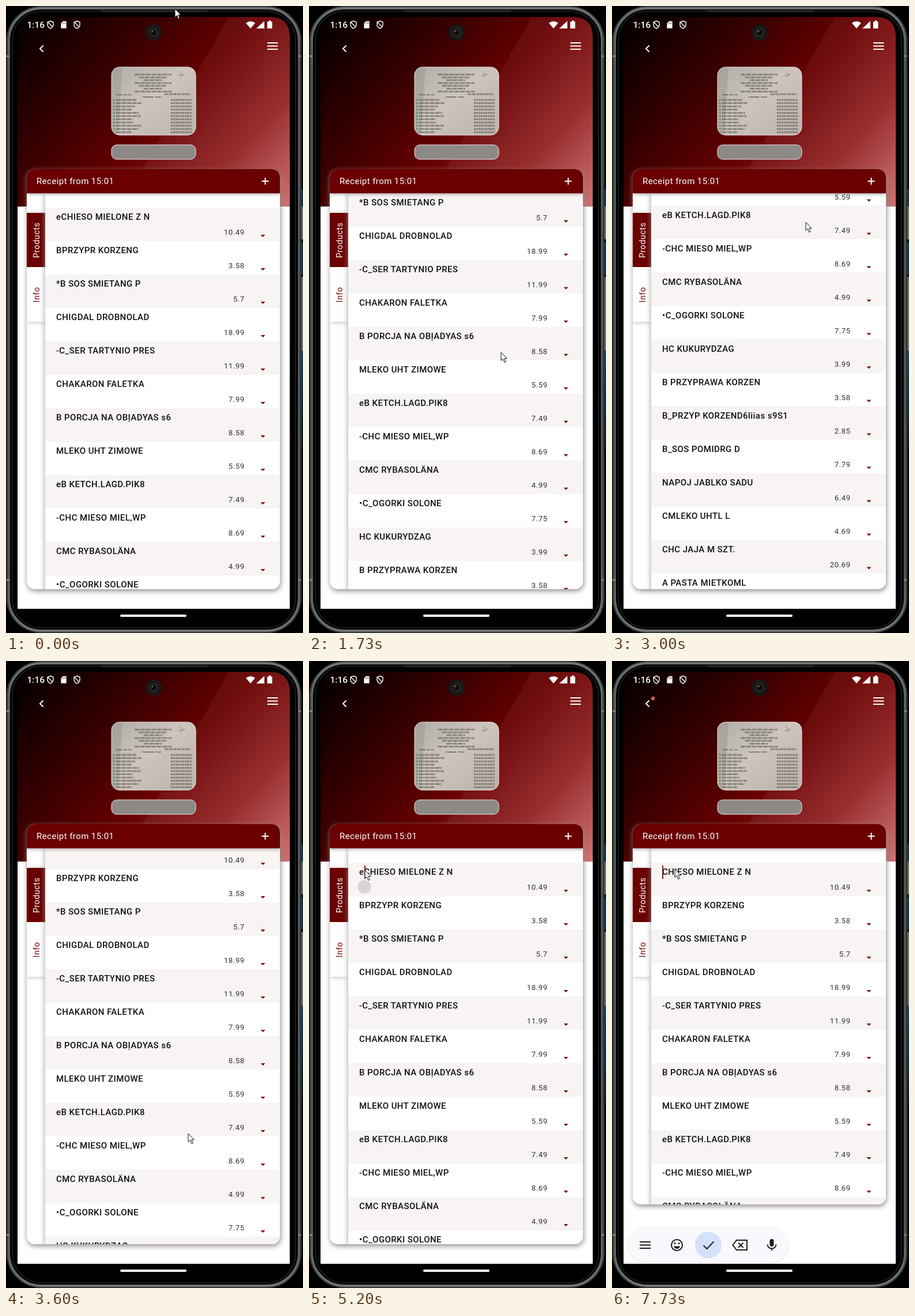
An HTML page for the animation above (8 s loop, 515x1088 px).

```html
<!DOCTYPE html>
<html lang="en">
<head>
<meta charset="utf-8">
<title>Receipt list</title>
<style>
  html, body { margin: 0; width: 100%; height: 100%; overflow: hidden; background: #000; }
  svg { display: block; width: 100vw; height: 100vh; }
  text { font-family: Roboto, sans-serif; letter-spacing: .43px; white-space: pre; }
  .clock { font-size: 15.5px; font-weight: 500; letter-spacing: 0; fill: #fff; }
  .title { font-size: 15px; font-weight: 500; fill: #111; }
  .price { font-size: 13.2px; letter-spacing: .6px; fill: #333; text-anchor: end; }
  .tab { font-size: 14.5px; text-anchor: middle; }
  .tiny { font: 700 4.4px "Liberation Mono", monospace; letter-spacing: 0; fill: #3d3936; }
  .line { fill: none; stroke: #fff; stroke-width: 2; }
  .icon { fill: none; stroke: #1f1f1f; stroke-width: 2; }
  .card { fill: #fff; filter: drop-shadow(1px 3px 5px rgb(140, 135, 135)); }
  .header { fill: #6a0000; filter: drop-shadow(0 1px 3px rgba(140, 130, 130, .9)); }
  .panel { fill: #fff; filter: drop-shadow(-1px 0 4px rgba(150, 145, 145, .75)); }
  .tabs { fill: #fff; filter: drop-shadow(0 1px 4px rgba(150, 145, 145, .6)); }
  .pill { fill: #f8f8fd; filter: drop-shadow(0 1px 2px rgba(0, 0, 0, .12)); }
</style>
</head>
<body>
<svg viewBox="0 0 515 1088" preserveAspectRatio="none">
  <defs>
    <linearGradient id="red" gradientUnits="userSpaceOnUse" x1="70" y1="10" x2="470" y2="370">
      <stop offset="0" stop-color="#0c0000"/>
      <stop offset=".28" stop-color="#3a0000"/>
      <stop offset=".52" stop-color="#680000"/>
      <stop offset=".76" stop-color="#932323"/>
      <stop offset="1" stop-color="#cc6a6a"/>
    </linearGradient>
    <linearGradient id="paper" x1="0" y1="0" x2="1" y2="1">
      <stop offset="0" stop-color="#b2aca6"/>
      <stop offset=".45" stop-color="#cbc5be"/>
      <stop offset="1" stop-color="#bbb3ac"/>
    </linearGradient>
    <linearGradient id="metal" x1="0" y1="0" x2="0" y2="1">
      <stop offset="0" stop-color="#6f7474"/>
      <stop offset=".1" stop-color="#505555"/>
      <stop offset=".9" stop-color="#505555"/>
      <stop offset="1" stop-color="#6f7474"/>
    </linearGradient>
    <linearGradient id="sea" x1="0" y1="0" x2="0" y2="1">
      <stop offset="0" stop-color="#0b4a78"/>
      <stop offset="1" stop-color="#02101c"/>
    </linearGradient>
    <clipPath id="cardClip"><rect class="fit" x="36" y="283" width="439" height="729" rx="14"/></clipPath>
    <clipPath id="photoClip"><rect x="183" y="106" width="146" height="118" rx="14"/></clipPath>
  </defs>

  <!-- Phone body -->
  <rect width="515" height="1088"/>
  <path d="M511 318h4v30h-4zM511 410h4v56h-4z" fill="#0a3554"/>
  <path d="M511 348h4v57h-4zM511 470h4v128h-4z" fill="#77716d"/>
  <path d="M511 598h4v170h-4z" fill="url(#sea)"/>
  <rect x="1.500" y="1" width="510" height="1086" rx="60" fill="#1c1e1e" stroke="#343838" stroke-width="2"/>
  <rect x="5" y="4" width="503" height="1080" rx="56" stroke="url(#metal)" stroke-width="4"/>
  <rect x="11" y="9" width="491" height="1070" rx="50" fill="none" stroke="#1b1d1d" stroke-width="2"/>
  <path d="M165 9H350" stroke="#2b2e2e" stroke-width="3"/>
  <path d="M1 87h5M1 996h5M507 87h4M507 996h4" stroke="#888" stroke-width="3"/>

  <!-- Screen -->
  <path d="M20 348V54Q20 19 55 19H457Q492 19 492 54V348Z" fill="url(#red)"/>
  <path d="M386 19H457Q492 19 492 54V348H200Z" fill="#fff" opacity=".05"/>
  <rect x="20" y="348" width="472" height="698" fill="#fff"/>
  <rect x="198" y="1056" width="115" height="4" rx="2" fill="#fff"/>
  <circle cx="256" cy="46" r="14" fill="#171919"/>
  <circle cx="256" cy="46" r="8" fill="#282421"/>
  <circle cx="256" cy="46" r="4.500" fill="#0b0908"/>
  <circle cx="254" cy="44" r="1.500" fill="#806b60"/>

  <!-- Status and app bar -->
  <text class="clock" x="36.500" y="37.500">1:16</text>
  <g id="shield" fill="none" stroke="#fff" stroke-width="1.400">
    <path d="M77 26l5 2v4.500q0 4-5 6.500q-5-2.500-5-6.500V28zM73 28.500l8 8"/>
  </g>
  <use href="#shield" x="46"/>
  <path d="M99 26h6v13H95V30zM98 29v3M100.500 28v3M103 28v3" fill="#fff" stroke="#300" stroke-width=".7"/>
  <path d="M416 29.500q8-6 16 0L424 39z" fill="#fff"/>
  <path d="M448 26V39H434z" fill="#fff"/>
  <path d="M454 27h2v-2h3v2h2.500v12H453V27z" fill="#fff"/>
  <path class="line" d="M64.500 68.500L59 74l5.500 5.500"/>
  <path class="line" d="M453 64h18.500M453 69.500h18.500M453 75h18.500"/>
  <circle id="dot" cx="71" cy="65" r="3.200" fill="#c95c5c"/>

  <!-- Receipt photo and code box -->
  <g clip-path="url(#photoClip)">
    <rect x="183" y="106" width="146" height="118" fill="url(#paper)"/>
    <path d="M183 106h19l-8 118h-11z" fill="#8f8983" opacity=".35"/>
    <g id="print" fill="none" stroke-width="3" opacity=".7"></g>
    <text class="tiny" x="191" y="154.500">2025-02-13</text>
    <text class="tiny" x="237" y="159">PARAGON FISK.</text>
    <path d="M302 113l4 9M298 121l12-3M302 124l8-7" stroke="#8e8781" fill="none"/>
  </g>
  <rect x="183" y="106" width="146" height="118" rx="14" fill="none" stroke="#eee3e3"/>
  <rect x="183" y="241" width="146" height="25" rx="9" fill="#8d8987" stroke="#f1e8e8"/>

  <!-- Card -->
  <rect class="card fit" x="36" y="283" width="439" height="729" rx="14"/>
  <g clip-path="url(#cardClip)">
    <rect class="tabs" x="36" y="359" width="32" height="189"/>
    <rect x="36" y="359" width="32" height="94" fill="#6a0000"/>
    <rect class="panel" x="68" y="325" width="420" height="720"/>
    <text class="tab" transform="translate(57.500 406.500) rotate(-90)" fill="#fff">Products</text>
    <text class="tab" transform="translate(57.500 501) rotate(-90)" fill="#7a0c0c">Info</text>
    <g id="list"></g>
    <rect class="header" x="36" y="283" width="439" height="42"/>
    <text x="53" y="309.300" font-size="15" fill="#fff">Receipt from 15:01</text>
    <path class="line" d="M449.500 298v12M443.500 304h12" stroke-width="1.700"/>
  </g>
  <rect id="caret" y="355" width="2" height="23" fill="#8a1010"/>
  <circle id="handle" cx="96" cy="392" r="11.500"/>

  <!-- Floating input bar -->
  <g id="bar">
    <rect class="pill" x="28.500" y="983" width="277.500" height="60" rx="30"/>
    <circle cx="167" cy="1013.500" r="23" fill="#d5e1fb"/>
    <path class="icon" d="M48 1008h19M48 1013.500h19M48 1019h19"/>
    <circle class="icon" cx="112.500" cy="1013.500" r="9.500"/>
    <path d="M107 1015.500h11q-1.500 4.500-5.500 4.500t-5.500-4.500z" fill="#1f1f1f"/>
    <circle cx="109" cy="1010.500" r="1.600" fill="#1f1f1f"/>
    <circle cx="116" cy="1010.500" r="1.600" fill="#1f1f1f"/>
    <path class="icon" d="M158.500 1014l6 6 12-12.500"/>
    <path class="icon" d="M216 1005h18v17h-18l-6.500-8.500zM219 1009.500l8.500 8.500M227.500 1009.500l-8.500 8.500"/>
    <rect x="273.500" y="1003" width="7" height="13" rx="3.500" fill="#1f1f1f"/>
    <path class="icon" d="M269.500 1012.500a7.500 7 0 0 0 15 0M277 1019.500v4"/>
  </g>
  <path id="mouse" d="M0 0V14.500L3.300 11.500 5.800 17.500 8.200 16.500 5.700 10.600H10.200Z" fill="#fff" stroke="#111"/>
</svg>

<script>
const $ = id => document.getElementById(id);
const SVG = "http://www.w3.org/2000/svg";

function add(parent, tag, attrs, text = "") {
  const el = parent.appendChild(document.createElementNS(SVG, tag));
  for (const name in attrs) el.setAttribute(name, attrs[name]);
  el.textContent = text;
  return el;
}

const ROW = 58, LIST_TOP = 325;
const items = `eCHIESO MIELONE Z N|10.49
BPRZYPR KORZENG|3.58
*B SOS SMIETANG P|5.7
CHIGDAL DROBNOLAD|18.99
-C_SER TARTYNIO PRES|11.99
CHAKARON FALETKA|7.99
B PORCJA NA OBỊADYAS s6|8.58
MLEKO UHT ZIMOWE|5.59
eB KETCH.LAGD.PIK8|7.49
-CHC MIESO MIEL,WP|8.69
CMC RYBASOLÄNA|4.99
•C_OGORKI SOLONE|7.75
HC KUKURYDZAG|3.99
B PRZYPRAWA KORZEN|3.58
B_PRZYP KORZEND6liias s9S1|2.85
B_SOS POMIDRG D|7.79
NAPOJ JABLKO SADU|6.49
CMLEKO UHTL L|4.69
CHC JAJA M SZT.|20.69
A PASTA MIETKOML|9.99`.split("\n").map(line => line.split("|"));

const titles = items.map(([name, price], i) => {
  const y = 350 + i * ROW;
  if (i % 2 === 0) add($("list"), "rect", { x: 68, y, width: 407, height: ROW, fill: "#f7f4f3" });
  add($("list"), "text", { class: "price", x: 413.8, y: y + 47.2 }, price);
  add($("list"), "path", { d: `M441.500 ${y + 47}h8l-4 4z`, fill: "#7a0c0c" });
  return add($("list"), "text", { class: "title", x: 87, y: y + 21 }, name);
});

// Illegible print on the receipt: dashed strokes stand for words.
function printLine(x1, x2, y, dash, stroke = "#5a5550") {
  add($("print"), "path", { d: `M${x1} ${y}H${x2}`, "stroke-dasharray": dash, stroke });
}
for (let i = 0; i < 7; i++) {
  const half = 24 + 9 * Math.sin(i * 2.1 + 1);
  printLine(255 - half, 255 + half, 119 + i * 4.9, "2 .8 3 .8 1.5 1.6");
}
printLine(275, 320, 153, "2 .8 3 1.5");
for (let i = 0; i < 11; i++) {
  const y = 163 + i * 5.6;
  printLine(185, 189, y, "none", "#4f8f5b");
  printLine(191, 226 + 9 * Math.sin(i * 1.7), y, "2 .7 3 .7 1.5 1.4");
  printLine(286, 322, y, "2 .7 1.5 .7 2 1.2");
}

// Keys are [time, ...values]; a trailing "ease" smooths the way to that key.
const mousePath = [
  [134, 293, 5], [867, 310, 868, "ease"], [1134, 310, 868], [1733, 333, 601],
  [2260, 341, 367], [2934, 341, 367], [3000, 336, 375], [3600, 316, 820],
  [3800, 312, 868], [3867, 312, 868], [4667, 109, 366, "ease"], [4867, 97, 363],
  [5200, 97, 363], [5800, 132, 417, "ease"], [6400, 132, 417],
  [7067, 101, 365, "ease"], [7200, 101, 365], [7733, 109, 361]
];
const scrollPath = [
  [1270, 0], [1733, 141], [2333, 331], [2800, 467.5], [3000, 467.5], [3600, 47], [3670, 0]
];
const stretchPath = [[3670, 1], [3867, 1.03], [4500, 1, "ease"]];
const bottomPath = [[6400, 1012], [6600, 943, "ease"]];
const handlePath = [[5200, .13], [5800, 0]];

function at(path, t, column = 1) {
  const next = path.findIndex(key => key[0] >= t);
  if (next < 0) return path[path.length - 1][column];
  if (next === 0) return path[0][column];
  const a = path[next - 1], b = path[next];
  let k = (t - a[0]) / (b[0] - a[0]);
  if (b[b.length - 1] === "ease") k = k * k * (3 - 2 * k);
  return a[column] + (b[column] - a[column]) * k;
}

const show = (el, visible) => el.setAttribute("visibility", visible ? "visible" : "hidden");
const place = (el, value) => el.setAttribute("transform", value);

const LOOP = 8000, STEP = 1000 / 15;

function render(time) {
  const t = Math.floor((time % LOOP + 4) / STEP) * STEP + .1;
  place($("mouse"), `translate(${at(mousePath, t)} ${at(mousePath, t, 2)})`);
  place($("list"), `translate(0 ${LIST_TOP}) scale(1 ${at(stretchPath, t)}) translate(0 ${-LIST_TOP - at(scrollPath, t)})`);

  const height = at(bottomPath, t) - 283;
  document.querySelectorAll(".fit").forEach(el => el.setAttribute("height", height));

  const edited = t > 6800;
  titles[0].textContent = items[0][0].slice(edited ? 1 : 0);
  show($("dot"), edited);
  $("caret").setAttribute("x", edited ? 87 : 96);
  show($("caret"), t > 5200 && !(t > 7266 && t < 7733));
  show($("handle"), t > 5200);
  $("handle").setAttribute("fill-opacity", at(handlePath, t));

  show($("bar"), t > 6200);
  place($("bar"), `translate(0 ${t < 6266 ? 28 : t < 6466 ? 14 : 0})`);
}

const start = performance.now();
function tick() {
  render(performance.now() - start);
  requestAnimationFrame(tick);
}
tick();
</script>
</body>
</html>
```
